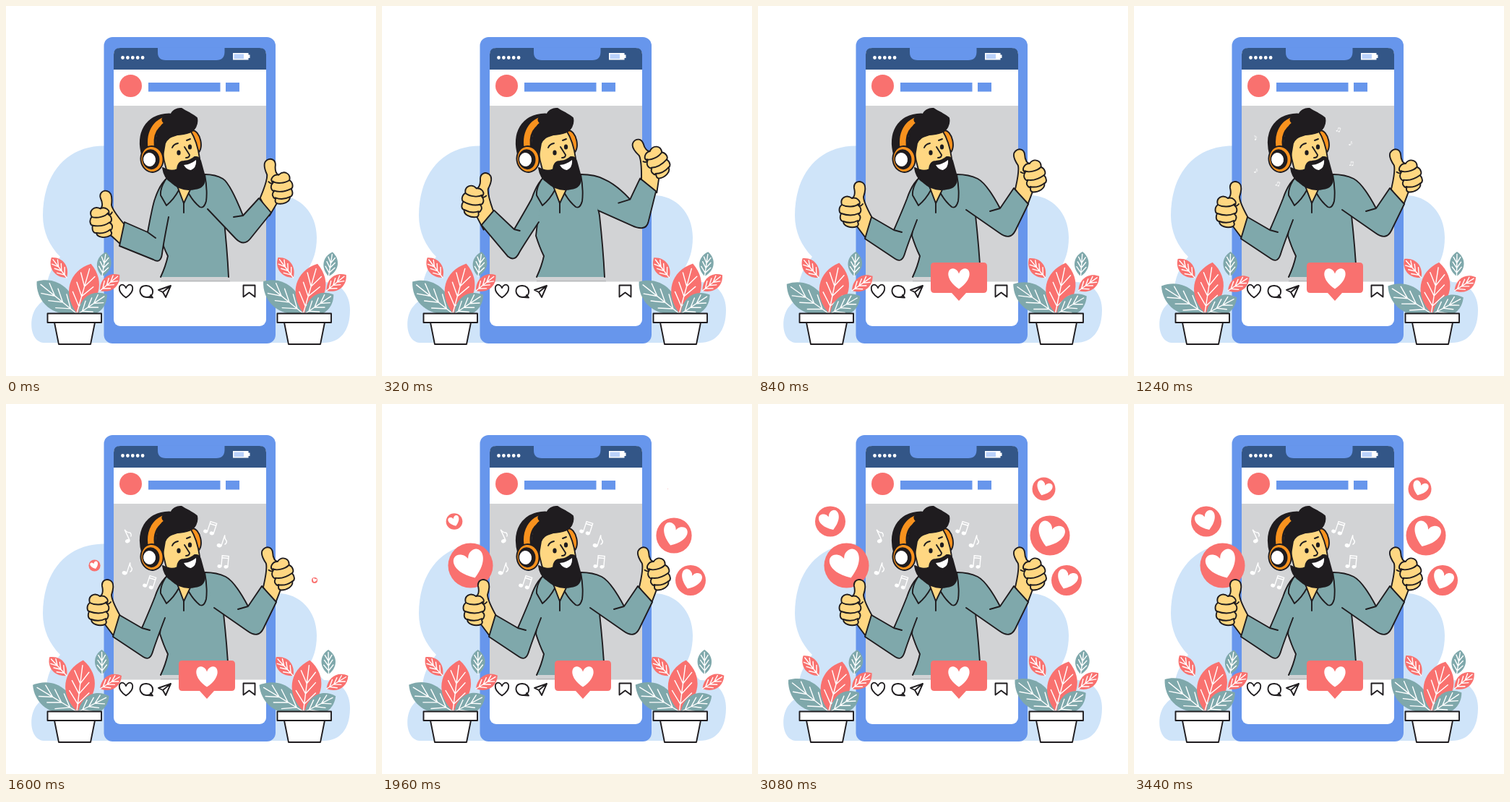
Recreate the animation shown at these times as an HTML page. Size 512 by 512 pixels, loop 3.6 s.

```html
<!DOCTYPE html>
<html>
<head>
<meta charset="utf-8">
<style>
  html, body { margin: 0; height: 100%; overflow: hidden; background: #fff; }
  svg { display: block; width: 100vw; height: 100vh; }
  .ink { stroke: #1f1c1f; stroke-width: 1.9; stroke-linejoin: round; stroke-linecap: round; }
  .line { fill: none; }
  .dark { fill: #1f1c1f; }
  .blue { fill: #6796ec; }
  .coral { fill: #f9716f; }
  .teal { fill: #7fa8ab; }
  .skin { fill: #ffd782; }
  .orange { fill: #f8921e; }
  .white { fill: #fff; }
  .plain { stroke: none; }
  .vein { fill: none; stroke: #fff; stroke-width: 1.4; stroke-linecap: round; }
</style>
</head>
<body>
<svg viewBox="0 0 512 512">
  <defs>
    <path id="heart" d="M0,9C-15,-1 -10,-13 -3,-9Q-1,-8 0,-5Q1,-8 3,-9C10,-13 15,-1 0,9Z"/>
    <g id="hand" class="ink skin">
      <path d="M5,-12C-1,-23 -8,-35 -8,-43C-5,-52 -4,-60 -10,-63C-16,-66 -22,-62 -21,-55C-19,-47 -21,-42 -24,-41C-32,-47 -41,-41 -38,-32C-43,-28 -42,-21 -39,-20C-42,-13 -39,-9 -36,-9C-36,-2 -25,1 -17,-2L-5,14Z"/>
      <path class="line" d="M-38,-32C-31,-28 -19,-29 -15,-33M-39,-20Q-25,-15 -15,-20M-36,-9Q-25,-5 -16,-10M-24,-41C-17,-43 -10,-36 -15,-31C-10,-27 -11,-21 -15,-19C-11,-16 -12,-11 -16,-8Q-14,-4 -17,-2M-9,-33q-3,4 -6,2"/>
    </g>
    <g id="single">
      <ellipse cx="-3" cy="7" rx="3.4" ry="2.6" class="white"/>
      <path class="vein" d="M0,7V-9Q1,-4 5,-2Q6,1 4,3"/>
    </g>
    <g id="double">
      <ellipse cx="-5" cy="7" rx="3" ry="2.4" class="white"/>
      <ellipse cx="4" cy="7" rx="3" ry="2.4" class="white"/>
      <path class="vein" d="M-2.5,7V-8H6.5V7M-2.5,-5H6.5"/>
    </g>
    <g id="pot" class="ink white">
      <path d="M67,438L73,468H117L123,438Z"/>
      <rect x="57.5" y="425.5" width="74.5" height="12.5"/>
    </g>
  </defs>

  <path fill="#cfe4f9" d="M52,466C32,464 31,430 43,416Q49,408 57,405C53,385 60,365 75,347C60,332 51,312 51,290C51,232 84,193.500 136,193.500L372,262C405,260 430,285 430,320C430,340 425,352 419,362L440,382C464,382 476,400 476,421C476,450 462,466 440,466Z"/>

  <rect class="blue" x="135.500" y="43" width="237.500" height="424" rx="12"/>
  <rect class="white" x="149" y="58" width="211" height="385" rx="9"/>
  <path fill="#335687" d="M149,88V67Q149,58 158,58H351Q360,58 360,67V88Z"/>
  <path class="blue" d="M210,57.500H302.500V64Q302,75 291,75H221Q210,75 210,64Z"/>
  <path d="M161.500,71.500h28" stroke="#fff" stroke-width="4.800" stroke-linecap="round" stroke-dasharray="0 6.900"/>
  <path class="white" d="M314,65h21.500v2.500h2v4.500h-2v2.500h-21.500Z"/>
  <path fill="#b9d1fa" d="M315.500,66.500h13.500v6.500h-13.500Z"/>
  <circle class="coral" cx="172.500" cy="110.500" r="15.500"/>
  <path class="blue" d="M197,106h99.500v12.500h-99.500ZM304,106h19v12.500h-19Z"/>
  <rect x="149" y="138" width="211" height="243.500" fill="#d2d3d5"/>
  <path d="M214,380.500h96" stroke="#b9babc" stroke-width="1.500"/>
  <g class="ink line">
    <use href="#heart" transform="translate(166 395) scale(.95)"/>
    <path d="M190,402C183,397 184,387 194,387C206,387 206,403 195,403Q193,403 190,402ZM196,403L203,403.500L200,400"/>
    <path d="M211,393L228,387L221,403L217,396ZM217,396L228,387"/>
    <path d="M328.500,386.500H344.500V402.500L336.500,396.500L328.500,402.500Z"/>
  </g>

  <g id="notes"></g>
  <g id="hearts"></g>

  <use id="handL" href="#hand"/>
  <use id="handR" href="#hand"/>
  <g class="ink teal">
    <path d="M214,375Q221,360 224,346Q218,334 213,318L222,240Q250,230 277,234L292,242L301,290Q306,335 308,375"/>
    <path id="armL"/>
    <path id="armR"/>
    <path d="M224,236Q213,250 214,262L222,276Q233,267 240,253Z"/>
    <path d="M275,233Q279,255 277,270Q274,281 268,278Q258,270 251,256Z"/>
    <path class="skin" d="M235,244L246,273L256,252Z"/>
    <path class="line" d="M246,273V286"/>
  </g>

  <g class="ink">
    <path class="line" d="M195,206C187,178 198,157 226,156" style="stroke-width:15"/>
    <path class="line" d="M204,202C197,177 207,160 228,157" style="stroke-width:12"/>
    <path class="line" d="M202,202C196,177 206,159 228,156" style="stroke:#f8921e;stroke-width:8.500"/>
    <ellipse class="orange" cx="261" cy="188" rx="8.500" ry="16" transform="rotate(-12 261 188)"/>
    <path class="skin" d="M216,185L255,172Q265,188 268,211L258,235L226,236Q216,215 216,185Z"/>
    <path class="dark" d="M217,208L209,204C206,186 210,168 219,162C212,156 220,151 228,151C230,145 237,141 243,142C250,147 258,149 264,155C266,164 261,172 254,175C247,178 241,178 235,178Q224,181 220,190Z"/>
    <path class="dark" d="M217,224Q228,230 237,226Q238,215 246,215Q256,214 261,209Q267,208 269,214L275,236Q276,252 261,253Q243,257 229,244Q219,238 217,224Z"/>
    <path class="white" d="M246,220Q256,219 263,213Q264,224 256,227Q250,227 246,220Z" style="stroke:none"/>
    <path class="line" d="M230,196Q232,191 238,190M250,186L255,184M247,195L254,206Q254,210 249,210"/>
    <ellipse class="dark" cx="239" cy="203" rx="1.700" ry="2.600"/>
    <ellipse class="dark" cx="254.500" cy="195" rx="1.700" ry="2.600"/>
    <g transform="rotate(-8 202 212)">
      <ellipse class="orange" cx="202" cy="212" rx="15.500" ry="18"/>
      <ellipse class="dark" cx="200.500" cy="212" rx="11" ry="13"/>
      <ellipse class="white plain" cx="198.500" cy="212" rx="8.500" ry="9.500"/>
    </g>
  </g>

  <g id="bubble">
    <path class="coral" d="M244,355H312Q317,355 317,360V392Q317,397 312,397H288L278,408L268,397H244Q239,397 239,392V360Q239,355 244,355Z"/>
    <use href="#heart" class="white" transform="translate(278 378) scale(1.500)"/>
  </g>

  <g id="leaves"></g>
  <use href="#leaves" x="313.500"/>
  <use href="#pot"/>
  <use href="#pot" x="318"/>
</svg>
<script>
const $ = id => document.getElementById(id);
const LOOP = 3600, STEP = 40, LAST = 3440;

// Arm outlines when low, at rest and high
const ARM_L = [
  'M225,292Q217,333 216,343Q214,357 204,351L157,332 164,299 196,313Q203,275 206,267Q213,246 224,237M196,313L207,321',
  'M220,296Q206,333 203,343Q199,356 190,350L148,322 157,292 188,310Q201,280 206,267Q213,246 224,237M188,310L199,313',
  'M217,299Q195,333 190,342Q184,354 175,347L138,304 155,283 183,309Q200,280 207,267Q214,246 224,237M183,309L191,311'];
const ARM_R = [
  'M279,281L318,322Q329,333 338,322L367,286 350,266 328,290Q310,245 300,239Q290,233 275,233M328,290L315,292',
  'M288,282L334,314Q349,325 356,311L374,274 354,252 335,280Q317,246 304,239Q292,233 275,233M335,280L321,284',
  'M299,283L345,304Q364,313 368,300L379,257 357,239 343,268Q324,247 308,240Q295,233 275,233M343,268L327,273'];

// base x, base y, angle, length, half width, colour, sway in degrees
const LEAVES = [
  [84, 376, -37, 35, 13, 'coral', -6],
  [133, 374, 9, 34, 13, 'teal', -10],
  [130, 394, 51, 35, 13, 'coral', 8],
  [97, 425, -51, 70, 24, 'teal', -8],
  [98, 425, 16, 71, 27, 'coral', -9],
  [100, 426, 56, 48, 18, 'teal', 7]];
// x, y, angle, shape
const NOTES = [
  [168, 182, -25, 'single'], [283, 171, 18, 'double'], [300, 190, 18, 'single'],
  [301, 218, 5, 'double'], [169, 228, 18, 'single'], [199, 246, 18, 'double']];
// x, y, radius, start time
const HEARTS = [
  [122.5, 223.5, 31, 1470], [427, 244, 21, 1490], [404, 182, 27.5, 1660],
  [100, 162.5, 21, 1760], [395.5, 117.5, 16, 1920]];

const smooth = u => (1 - Math.cos(Math.PI * Math.min(1, Math.max(0, u)))) / 2;
const ramp = (t, from, to) => smooth((t - from) / (to - from));
const curve = (a, b, c, p) => a * (1 - p) * (2 - p) / 2 + b * p * (2 - p) + c * p * (p - 1) / 2;

function morph(poses, p) {
  const [, mid, high] = poses.map(s => s.match(/\d+/g));
  let i = 0;
  return poses[0].replace(/\d+/g, n => curve(+n, +mid[i], +high[i++], p).toFixed(2));
}

function leaf([, , , len, w, colour]) {
  let veins = `M0,0V${-len * .9}`;
  for (const k of [.14, .34, .54]) {
    const x = w * .55 * (1 - k * .6), y = -len * (k + .24);
    veins += `M${-x},${y}L0,${-len * k}L${x},${y}`;
  }
  return `<g><path class="${colour}" d="M0,0C${w},${-len * .28} ${w},${-len * .75} 0,${-len}
    C${-w},${-len * .75} ${-w},${-len * .28} 0,0Z"/><path class="vein" d="${veins}"/></g>`;
}

$('leaves').innerHTML = LEAVES.map(leaf).join('');
$('notes').innerHTML = NOTES.map(n => `<use href="#${n[3]}"/>`).join('');
$('hearts').innerHTML = HEARTS.map(([x, , r]) => `<g><circle class="coral" r="${r}"/>
  <use href="#heart" class="white" transform="rotate(${x < 256 ? -20 : 20}) scale(${r / 14.5} ${r / 15.5})"/></g>`).join('');

const place = (el, ...parts) => el.setAttribute('transform', parts.join(' '));

function draw(t) {
  const lift = t < 400 ? 2.25 * smooth(t / 400) : 2.25 - 1.25 * ramp(t, 400, 800);
  $('armL').setAttribute('d', morph(ARM_L, lift));
  $('armR').setAttribute('d', morph(ARM_R, lift));
  place($('handL'), `translate(${curve(162, 154, 148, lift)} ${curve(316, 307, 297, lift)})`,
    `rotate(${curve(-11, 0, 9, lift)})`);
  place($('handR'), `translate(${curve(358, 364, 369, lift)} ${curve(277, 264, 249, lift)})`,
    `rotate(${curve(9.7, 0, -12, lift)}) scale(-1 1) rotate(16)`);

  place($('bubble'), `translate(278 413) scale(${ramp(t, 375, 720)}) translate(-278 -413)`);

  const sway = smooth(t / 1720) - ramp(t, 1720, LAST);
  LEAVES.forEach(([x, y, angle, , , , swing], i) =>
    place($('leaves').children[i], `translate(${x} ${y}) rotate(${angle + swing * sway})`));
  NOTES.forEach(([x, y, angle], i) =>
    place($('notes').children[i], `translate(${x} ${y}) rotate(${angle}) scale(${ramp(t, 1080, 1480)})`));
  HEARTS.forEach(([x, y, , start], i) =>
    place($('hearts').children[i], `translate(${x} ${y}) scale(${ramp(t, start, start + 380)})`));
}

function tick() {
  const t = performance.now() % LOOP;
  draw(Math.min(LAST, Math.floor(t / STEP) * STEP));
  requestAnimationFrame(tick);
}
tick();
</script>
</body>
</html>
```
